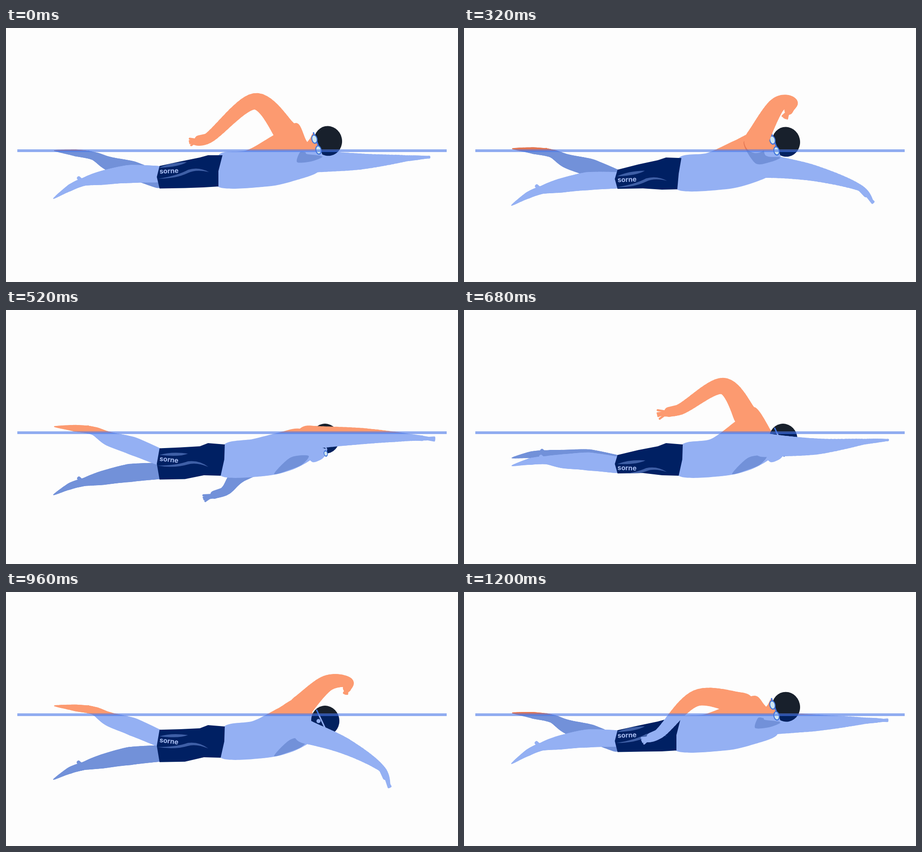
An HTML page with a canvas that plays this animation: 998x561 px, repeating every 1.24 s.

```html
<!DOCTYPE html>
<html lang="en">
<head>
<meta charset="utf-8">
<title>Freestyle swimmer</title>
<style>
  html, body { margin: 0; width: 100%; height: 100%; overflow: hidden; background: #fdfdfd; }
  canvas { display: block; width: 998px; height: 561px; }
</style>
</head>
<body>
<canvas id="stage" width="998" height="561"></canvas>
<script>
const ctx = document.getElementById('stage').getContext('2d');
const LOOP = 1240, STEP = 40, WATER = 271;
const { cos, sin, tanh, min, max, PI } = Math;

const AIR = { skin: '#fc9a70', dark: '#e27653', cap: '#18202c', strap: '#3f73e0' };
const SEA = { skin: '#94b0f3', dark: '#7291d9', cap: '#02215f', strap: '#94b0f3' };

const mix = (a, b, u) => a + (b - a) * u;
const wave = (t, peak, cycles = 1) => cos(2 * PI * cycles * (t - peak) / LOOP);
const ease = (a, b, t) => {
  const u = max(0, min(1, (t - a) / (b - a)));
  return u * u * (3 - 2 * u);
};
const toPoints = v => Array.from({ length: v.length / 2 }, (_, i) => [v[2 * i], v[2 * i + 1]]);
const mixPoints = (a, b, u) => toPoints(a.map((v, i) => mix(v, b[i], u)));

// One arm stroke: time, then shoulder, elbow, wrist and fingertip.
// Both arms follow it, half a loop apart.
const STROKE = [
  [0, 618, 230, 549, 162, 447, 243, 406, 252],
  [160, 630, 228, 603, 133, 537, 163, 480, 187],
  [220, 632, 247, 624, 146, 604, 148, 587, 153],
  [320, 645, 250, 690, 172, 726, 166, 708, 198],
  [420, 668, 266, 775, 249, 872, 261, 925, 276],
  [600, 662, 292, 782, 292, 885, 286, 934, 284],
  [810, 660, 304, 767, 311, 880, 302, 933, 304],
  [940, 665, 304, 770, 320, 872, 352, 903, 385],
  [1000, 642, 320, 676, 398, 696, 482, 682, 540],
  [1040, 622, 330, 614, 413, 639, 472, 610, 516],
  [1140, 600, 320, 518, 362, 483, 400, 437, 416],
  [1200, 615, 249, 514, 234, 432, 312, 394, 329]
];

// Smooth cyclic interpolation between the stroke's poses.
function stroke(t) {
  const n = STROKE.length;
  const row = i => STROKE[(i + n) % n];
  const at = i => row(i)[0] + LOOP * Math.floor(i / n);
  const slope = (i, j) => (row(i + 1)[j] - row(i - 1)[j]) / (at(i + 1) - at(i - 1));
  let i = n - 1;
  while (at(i) > t) i--;
  const d = at(i + 1) - at(i), u = (t - at(i)) / d, v = 1 - u;
  return toPoints(row(i).slice(1).map((a, k) => {
    const j = k + 1;
    return v * v * (1 + 2 * u) * a + u * u * (3 - 2 * u) * row(i + 1)[j] +
      d * u * v * (v * slope(i, j) - u * slope(i + 1, j));
  }));
}

// Leg joints from hip to toe: rest place, kick height and sway.
const LEG = {
  x: [336, 275, 220, 183, 147, 106],
  y: [340, 331, 329, 325, 327, 335],
  kick: [17, 32, 46, 60, 68, 80],
  sway: [0, 4, 8, 11, 6, 1],
  width: [36, 40, 31, 18, 15, 2]
};

function leg(kick, gain, shift) {
  return LEG.x.map((x, j) => [
    x - LEG.sway[j] * kick,
    LEG.y[j] + LEG.kick[j] * gain * kick + shift * (1 - j * j / 25)
  ]);
}

// Everything that moves, worked out for one moment.
function poseAt(t) {
  const roll = ease(200, 480, t) - ease(1060, 1190, t);
  const turn = ease(340, 490, t) - ease(1060, 1190, t);
  const kick = -tanh(2 * wave(t, 160, 3)) / tanh(2);
  const farTime = (t + LOOP / 2) % LOOP;
  const nearArm = stroke(t);
  const farArm = stroke(farTime).map(([x, y]) => [x, y < WATER ? mix(WATER, y, .8) : y]);
  return {
    roll, turn, kick, nearArm, farArm,
    nearFan: max(0, .2 + .2 * wave(t, 130)),
    farFan: max(0, .2 + .2 * wave(farTime, 130)),
    farShaded: farTime > 1000 && farTime < 1200,
    nearLeg: leg(kick, mix(.55, 1.06, roll), -26 * (1 - roll)),
    farLeg: leg(-kick, mix(.85, 1, roll), 9 * (1 - roll)),
    shoulder: min(nearArm[0][1], farArm[0][1]) - 20,
    head: [mix(711, 705, turn), mix(242 + 27 * (1 - wave(t, 150)), 284, turn)]
  };
}

function fillBlob(p, color) {
  const n = p.length, q = i => p[(i + n) % n];
  ctx.beginPath();
  ctx.moveTo(...p[0]);
  for (let i = 0; i < n; i++) {
    const [a, b, c, d] = [q(i - 1), q(i), q(i + 1), q(i + 2)];
    ctx.bezierCurveTo(b[0] + (c[0] - a[0]) / 7, b[1] + (c[1] - a[1]) / 7,
      c[0] - (d[0] - b[0]) / 7, c[1] - (d[1] - b[1]) / 7, c[0], c[1]);
  }
  ctx.fillStyle = color;
  ctx.fill();
}

function line(a, b, width, color) {
  ctx.strokeStyle = color;
  ctx.lineWidth = width;
  ctx.beginPath();
  ctx.moveTo(...a);
  ctx.lineTo(...b);
  ctx.stroke();
}

function disc(x, y, rx, ry, color) {
  ctx.beginPath();
  ctx.ellipse(x, y, rx, ry, -.2, 0, 7);
  ctx.fillStyle = color;
  ctx.fill();
}

const bend = (a, b, c, d, u) => b + u / 2 * (c - a +
  u * (2 * a - 5 * b + 4 * c - d + u * (3 * (b - c) + d - a)));

// Tapered stroke along a smooth centre line.
function limb(joints, widths, color) {
  const p = joints.map((xy, i) => [...xy, widths[i]]);
  const n = p.length, q = i => p[max(0, min(n - 1, i))];
  let last = p[0];
  for (let i = 0; i < n - 1; i++) {
    for (let k = 1; k <= 14; k++) {
      const u = k / 14;
      const next = [0, 1].map(j => bend(q(i - 1)[j], q(i)[j], q(i + 1)[j], q(i + 2)[j], u));
      line(last.slice(0, 2), next, max(1.5, mix(q(i)[2], q(i + 1)[2], u)), color);
      last = next;
    }
  }
}

function drawLeg(joints, color) {
  limb(joints, LEG.width, color);
  const [x, y] = joints[3];
  line([x - 3, y], [x - 12, y - 8], 8, color);
}

function drawArm(joints, fan, color) {
  limb(joints, [54, 36, 12 + 32 * fan, 4], color);
  const [, , wrist, tip] = joints;
  const dx = (tip[0] - wrist[0]) / 2, dy = (tip[1] - wrist[1]) / 2;
  const palm = [wrist[0] + dx, wrist[1] + dy];
  line(wrist, palm, 8 + 36 * fan, color);
  for (const f of [-1, -.33, .33, 1]) {
    const c = cos(f * fan), s = sin(f * fan);
    line(palm, [palm[0] + dx * c - dy * s, palm[1] + dx * s + dy * c], 4.5, color);
  }
}

function drawTorso({ roll, shoulder }, pal) {
  const back = 268 + 15 * roll;
  fillBlob([
    [mix(470, 481, roll), 280 + 18 * roll],
    [mix(532, 545, roll), back + 2],
    [mix(592, 600, roll), mix(back, shoulder, .55)],
    [642, shoulder],
    [mix(664, 680, roll), mix(250, 270, roll)],
    [692, 285],
    [690, 317],
    [641, mix(336, 349, roll)],
    [577, mix(350, 366, roll)],
    [mix(467, 474, roll), mix(350, 366, roll)]
  ], pal.skin);
}

function drawTrunks({ roll, kick, nearLeg, farLeg }) {
  const near = nearLeg[0][1], far = farLeg[0][1];
  const top = min(near, far) - 18, bottom = max(near, far) + 19;
  const shape = [
    [339, top], [385, mix(top, 288 + 14 * roll, .6)], [428, 286 + 15 * roll], [446, 281 + 13 * roll],
    [mix(478, 483, roll), 281 + 16 * roll], [469 + 13 * roll, 316 + 14 * roll],
    [mix(469, 474, roll), 350 + 16 * roll], [437, 352 + 13 * roll],
    [395, bottom - 1], [339, bottom], [333, (near + far) / 2]
  ];
  ctx.save();
  ctx.beginPath();
  for (const p of shape) ctx.lineTo(...p);
  ctx.closePath();
  ctx.fillStyle = '#002063';
  ctx.fill();
  ctx.clip();
  ctx.translate(360, near - 8 + 14 * roll);
  ctx.rotate(-.04 + .08 * roll * (1 - kick));
  ctx.fillStyle = '#3f5fa6';
  ctx.fill(new Path2D('M-22-7Q4-18 40-17Q22-7-22-7Z M-24 17Q18 12 42 0Q66-6 88 7Q60-1 42 7Q14 19-24 17Z'));
  ctx.fillStyle = '#a9bdf0';
  ctx.font = '700 15px Inter, sans-serif';
  ctx.textAlign = 'center';
  ctx.fillText('sorne', 0, 6);
  ctx.restore();
}

// Drawn around the centre of the cap: breathing sideways or facing down.
function drawHead({ head, turn, roll }, pal) {
  ctx.save();
  ctx.translate(...head);
  disc(0, 0, 31, 33, pal.cap);
  fillBlob(mixPoints(
    [-40, -5, -32, -17, -22, 8, -14, 34, -42, 38, -57, 20],
    [-37, 5, -14, 17, 4, 26, -6, 44, -28, 52, -41, 34], turn), pal.skin);
  if (turn < .5) {
    fillBlob([[-68, 47], [-62 - 80 * roll, 25 - 62 * roll], [-50 - 10 * roll, 25 - 110 * roll],
      [-46, 29], [-12, 34], [-36, 45]], pal.dark);
  }
  const [a, b, one, two] = mixPoints(
    [-32, -18, -13, 33, -30, -4, -21, 20],
    [-19, -23, 3, 24, 1, 33, 1, 33], turn);
  line(a, b, 3, pal.strap);
  const r = mix(9.5, 6, turn);
  for (const [x, y] of [one, two]) {
    disc(x, y, r * .72, r + 1, '#3f73d8');
    disc(x, y, r * .5, r - 1.5, '#cfe6f1');
  }
  disc(-15, 1, 4.5 * turn, 4.5 * turn, SEA.skin);
  ctx.restore();
}

function drawSwimmer(pose, pal, top, height) {
  ctx.save();
  ctx.beginPath();
  ctx.rect(0, top, 998, height);
  ctx.clip();
  drawLeg(pose.farLeg, pal.dark);
  drawArm(pose.farArm, pose.farFan, pose.farShaded ? pal.dark : pal.skin);
  drawTorso(pose, pal);
  drawLeg(pose.nearLeg, pal.skin);
  drawTrunks(pose);
  drawHead(pose, pal);
  if (pose.turn > .5) fillBlob(toPoints([592, 362, 628, 326, 668, 322, 654, 341, 626, 353]), pal.dark);
  drawArm(pose.nearArm, pose.nearFan, pal.skin);
  ctx.restore();
}

function draw(t) {
  const pose = poseAt(t);
  ctx.fillStyle = '#fdfdfd';
  ctx.fillRect(0, 0, 998, 561);
  ctx.lineCap = 'round';
  drawSwimmer(pose, AIR, 0, WATER);
  drawSwimmer(pose, SEA, WATER, 561 - WATER);
  ctx.fillStyle = 'rgba(72, 119, 232, .6)';
  ctx.fillRect(25, WATER - 3, 948, 6);
}

let start;
function tick(now) {
  start ??= now;
  draw(Math.floor((now - start) % LOOP / STEP) * STEP);
  requestAnimationFrame(tick);
}
draw(0);
requestAnimationFrame(tick);
</script>
</body>
</html>
```
